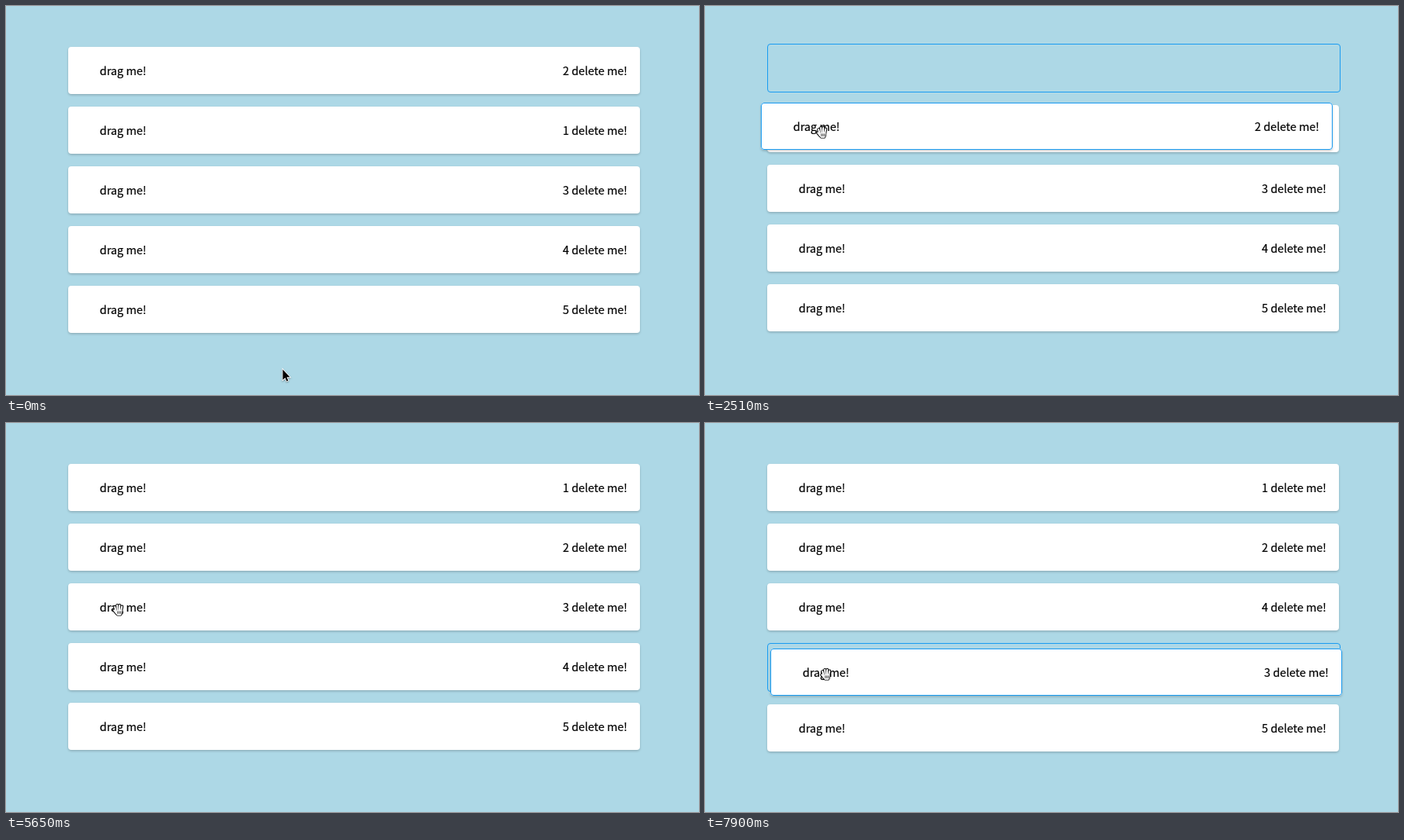
Recreate the animation shown at these times as an HTML page with a canvas. Size 880 px wide and 495 px high, loop 8000 ms.

```html
<!DOCTYPE html>
<html lang="en">
<head>
<meta charset="utf-8">
<title>Sortable list</title>
<style>
html, body { margin: 0; width: 100%; height: 100%; overflow: hidden; background: #add8e6; }
canvas { display: block; }
</style>
</head>
<body>
<canvas id="stage" width="880" height="495"></canvas>
<script>
const ctx = document.getElementById('stage').getContext('2d');
const LOOP = 8000, LEFT = 79, TOP = 52, WIDTH = 726, HEIGHT = 60, GAP = 16;
const BLUE = '#1a9cf2';
const FONT = '14.33px "Noto Sans CJK SC", "Noto Sans CJK JP", "Noto Sans CJK", "Open Sans", sans-serif';

// Pointer strokes, timed in steps; each eases out from where the last one ended.
const REST = { x: 351, y: 462 };
const MOVES = [
  { from: 3, to: 11, x: 157, y: 86 },
  { from: 15, to: 18, x: 148, y: 170 },
  { from: 18, to: 21, x: 155, y: 170 },
  { from: 21, to: 23, x: 155, y: 168 },
  { from: 28, to: 32, x: 124, y: 254 },
  { from: 37, to: 38, x: 143, y: 238 },
  { from: 38, to: 41, x: 150, y: 237 },
  { from: 42, to: 48, x: 158.5, y: 320 },
  { from: 48, to: 49, x: 154, y: 320 }
];

// A dragged item trades places with the next one at "swap".
const DRAGS = [
  { item: 2, from: 14, swap: 18, to: 26, dx: 78, dy: 34 },
  { item: 3, from: 41, swap: 46, to: 54, dx: 71, dy: 33 }
];
const LAG = 0.17;

// The screen refreshes about every 150 ms, a little faster at first.
const stepAt = ms => Math.floor(Math.min(ms / 147.5, (ms + 50) / 150));

function pointer(n) {
  let { x, y } = REST;
  for (const m of MOVES) {
    const u = Math.min(1, Math.max(0, (n - m.from) / (m.to - m.from)));
    const k = 1 - (1 - u) ** 2;
    x += (m.x - x) * k;
    y += (m.y - y) * k;
  }
  return { x, y };
}

function order(n) {
  const items = [2, 1, 3, 4, 5];
  for (const d of DRAGS.filter(d => n >= d.swap)) {
    const i = items.indexOf(d.item);
    items.splice(i, 2, items[i + 1], d.item);
  }
  return items;
}

function outline(x, y, w, h) {
  ctx.beginPath();
  ctx.roundRect(x + 0.5, y + 0.5, w - 1, h - 1, 3.5);
  ctx.strokeStyle = BLUE;
  ctx.lineWidth = 1;
  ctx.stroke();
}

function label(text, x, y, align) {
  ctx.font = FONT;
  ctx.textAlign = align;
  ctx.fillStyle = ctx.strokeStyle = '#000';
  ctx.lineWidth = 0.2;
  ctx.fillText(text, x, y);
  ctx.strokeText(text, x, y);
}

function card(item, x, y, lifted) {
  ctx.save();
  ctx.shadowColor = 'rgba(0,0,0,0.2)';
  ctx.shadowBlur = 3;
  ctx.shadowOffsetY = 1.5;
  ctx.fillStyle = '#fff';
  ctx.beginPath();
  ctx.roundRect(x, y, WIDTH, HEIGHT, 4);
  ctx.fill();
  ctx.restore();
  if (lifted) outline(x, y, WIDTH, HEIGHT);
  const inset = lifted ? 1 : 0;
  label('drag me!', x + 40 + inset, y + 36, 'left');
  label(item + ' delete me!', x + WIDTH - 16 - inset, y + 36, 'right');
}

function line(x0, y0, x1, y1, color, width) {
  ctx.beginPath();
  ctx.moveTo(x0, y0);
  ctx.lineTo(x1, y1);
  ctx.strokeStyle = color;
  ctx.lineWidth = width;
  ctx.stroke();
}

function arrow() {
  const shape = new Path2D('M.5.5V15L3.8 12 5.9 16.8 8 15.9 6 11.2H10.3Z');
  ctx.scale(0.92, 0.92);
  ctx.save();
  ctx.shadowColor = 'rgba(0,0,0,0.35)';
  ctx.shadowBlur = 2;
  ctx.shadowOffsetY = 1;
  ctx.strokeStyle = '#fff';
  ctx.lineWidth = 1.8;
  ctx.stroke(shape);
  ctx.restore();
  ctx.fillStyle = '#000';
  ctx.fill(shape);
}

function hand() {
  const palm = new Path2D('M-3 1L4.3.5 4 4 2.7 6.5H-1.7L-4 3.5Z');
  ctx.lineCap = ctx.lineJoin = 'round';
  // Black silhouette first, then the white inside.
  for (const [color, edge] of [['#000', 2], ['#fff', 0]]) {
    ctx.fillStyle = ctx.strokeStyle = color;
    ctx.lineWidth = edge || 0.5;
    ctx.stroke(palm);
    ctx.fill(palm);
    line(-5.8, 0.4, -2.5, 4, color, 2.1 + edge);
    for (let i = 0; i < 4; i++) {
      const side = i - 1.6;
      line(side * 3, side * side * 0.9 - 6.2, side * 2, 2, color, 2.1 + edge);
    }
  }
  for (let x = -1.2; x < 3; x += 2) line(x, 1.8, x, 4.4, '#000', 0.8);
}

function draw(ms) {
  const n = stepAt(ms);
  const drag = DRAGS.find(d => n >= d.from && n < d.to);
  ctx.fillStyle = '#add8e6';
  ctx.fillRect(0, 0, 880, 495);

  let y = TOP;
  order(n).forEach((item, i) => {
    if (drag && drag.item === item) {
      if (i === 0) y -= 4;
      outline(LEFT, y, WIDTH + 2, HEIGHT + 2);
      y += 2;
    } else {
      card(item, LEFT, y, false);
    }
    y += HEIGHT + GAP;
  });

  if (drag) {
    const p = pointer(n - LAG);
    card(drag.item, Math.round(p.x - drag.dx), Math.round(p.y - drag.dy), true);
  }

  const p = pointer(n);
  ctx.save();
  ctx.translate(Math.round(p.x), Math.round(p.y));
  if (p.x > 180) arrow();
  else hand();
  ctx.restore();
}

const start = performance.now();
function tick() {
  draw((performance.now() - start) % LOOP);
  requestAnimationFrame(tick);
}
tick();
</script>
</body>
</html>
```
